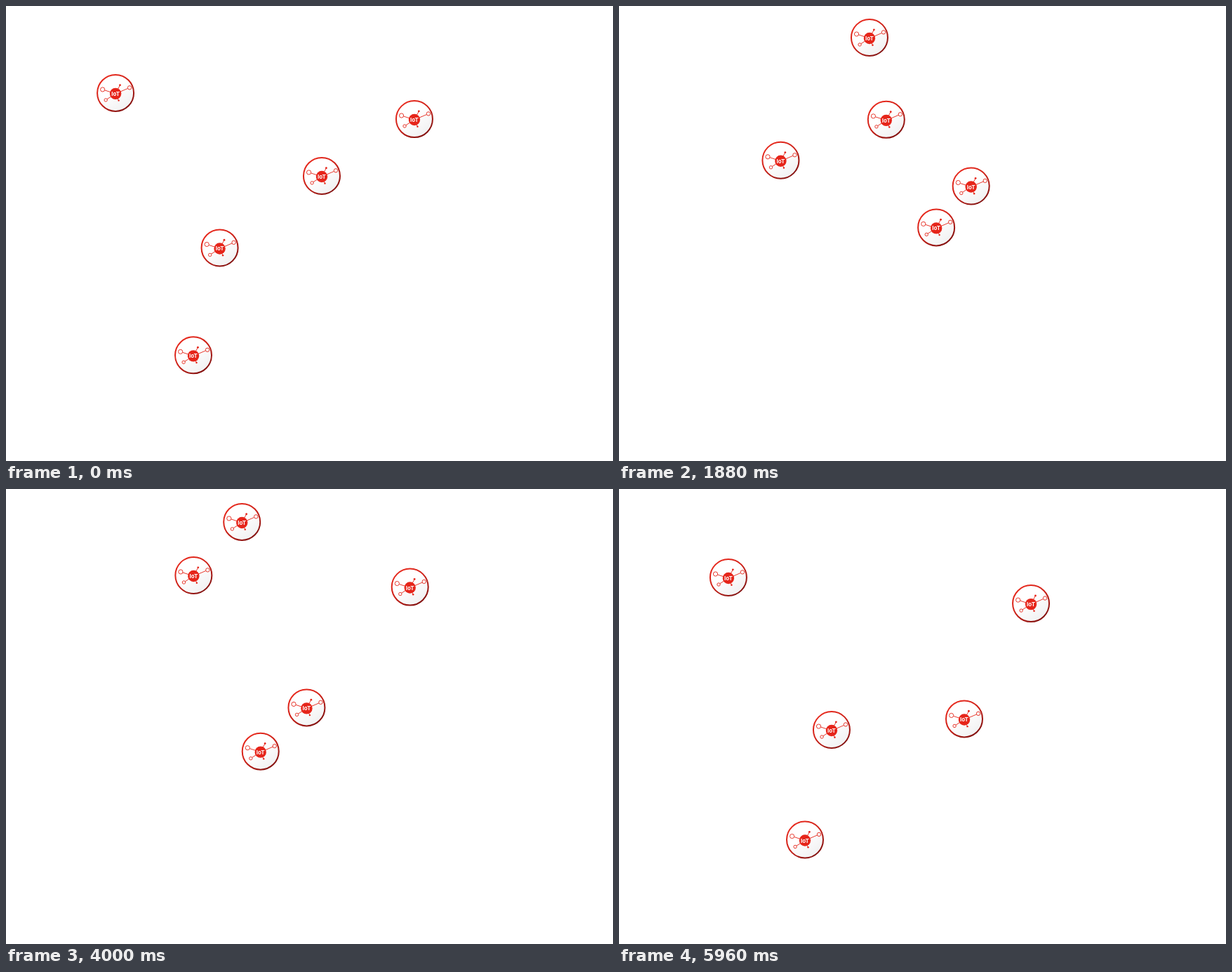
Write an HTML page that moves like this. It is 865 px wide and 648 px high and loops after 6000 ms.

```html
<!DOCTYPE html>
<html lang="en">
<head>
<meta charset="utf-8">
<title>Moving IoT nodes</title>
<style>
  html, body { margin: 0; width: 100%; height: 100%; overflow: hidden; background: #fff; }
  .stage { position: relative; width: 865px; height: 648px; overflow: hidden; }
  .defs { position: absolute; }
  .ball {
    position: absolute; left: 0; top: 0; width: 56px; height: 56px;
    offset-rotate: 0deg; offset-anchor: 50% 50%;
    animation: ride 6s linear infinite;
  }
  @keyframes ride {
    from { offset-distance: 0%; }
    to { offset-distance: 100%; }
  }
  .label { font: 700 8px Inter, "Open Sans", sans-serif; fill: #fff; text-anchor: middle; }
</style>
</head>
<body>
<div class="stage" id="stage">
  <svg class="defs" width="0" height="0">
    <defs>
      <linearGradient id="rim" x1="0.2" y1="0.1" x2="0.8" y2="0.9">
        <stop offset="0" stop-color="#e6291d"/>
        <stop offset="0.45" stop-color="#cf2219"/>
        <stop offset="1" stop-color="#861210"/>
      </linearGradient>
      <linearGradient id="face" x1="0.2" y1="0.1" x2="0.8" y2="0.9">
        <stop offset="0.4" stop-color="#fff"/>
        <stop offset="1" stop-color="#f1f1f2"/>
      </linearGradient>
      <g id="node">
        <circle r="26" fill="url(#face)" stroke="url(#rim)" stroke-width="2"/>
        <g fill="none" stroke="#e8392e" stroke-width="1">
          <path d="M0 1L-15.4 -4M0 1L-12.2 8.8M0 1L17.5 -6.5M0 1L6.3 -11M0 1L4.4 10.5"/>
          <circle cx="-18.4" cy="-5" r="3.1"/>
          <circle cx="-13.9" cy="10" r="2.2"/>
          <circle cx="20" cy="-7.6" r="2.7"/>
        </g>
        <g fill="#e6251a">
          <circle cx="6.4" cy="-11.2" r="1.4"/>
          <circle cx="4.5" cy="10.7" r="1.2"/>
          <circle cy="1" r="8.2"/>
        </g>
        <text class="label" y="4">IoT</text>
      </g>
    </defs>
  </svg>
</div>
<script>
  // One route per ball; "|" marks a sharp turn between two smooth legs.
  const routes = [
    "156,124 215,78 267.5,58 356.5,45 477.5,61 507,75 576,140 588.5,162 | 560,176 525,211 504,244 492,327.5 491.4,332",
    "582,161 547,186 525.5,211 501.5,257 489,326 488.5,334 | 452.5,316 429,311.5 390,309 346,320 303,343 300.7,344.4",
    "450,242 414.5,189 381,162 327.5,136.5 267.5,123 196.5,121.5 156,126 153.7,126.3",
    "304.5,344.5 346,320 390,309 452.5,315.5 490,335.5 | 448,343 363,373.5 330,396 290,445 265,499.5 264,502.6",
    "267,497.5 264.5,328 230,219 168,138 159,124 | 182,96 218,75 335.5,47 407,46 516,82 572,137 587,163 590,168.2"
  ];

  // Smooth curve through points, with tangents weighted by chord length.
  function curve(pts) {
    const last = pts.length - 1;
    const len = [], slope = [];
    for (let i = 0; i < last; i++) {
      const dx = pts[i + 1][0] - pts[i][0], dy = pts[i + 1][1] - pts[i][1];
      len[i] = Math.hypot(dx, dy);
      slope[i] = [dx / len[i], dy / len[i]];
    }
    const tan = pts.map((_, i) => {
      if (i === 0 || i === last) return null;
      const a = len[i - 1], b = len[i];
      return [0, 1].map(k => (slope[i - 1][k] * b + slope[i][k] * a) / (a + b));
    });
    const endTan = (s, t) => [0, 1].map(k => 1.5 * s[k] - 0.5 * t[k]);
    tan[0] = endTan(slope[0], tan[1]);
    tan[last] = endTan(slope[last - 1], tan[last - 1]);

    const handle = (i, d) => pts[i].map((v, k) => (v + tan[i][k] * d / 3).toFixed(2));
    return len.map((h, i) => `C${handle(i, h)} ${handle(i + 1, -h)} ${pts[i + 1]}`).join("");
  }

  function pathOf(route) {
    const legs = route.split("|").map(leg => leg.trim().split(" ").map(p => p.split(",").map(Number)));
    let d = "M" + legs[0][0];
    legs.forEach((leg, i) => {
      if (i) leg.unshift(legs[i - 1].at(-1));
      d += curve(leg);
    });
    return d;
  }

  const stage = document.getElementById("stage");
  for (const route of routes) {
    stage.insertAdjacentHTML("beforeend",
      '<svg class="ball" viewBox="-28 -28 56 56"><use href="#node"/></svg>');
    stage.lastElementChild.style.offsetPath = `path("${pathOf(route)}")`;
  }
</script>
</body>
</html>
```
